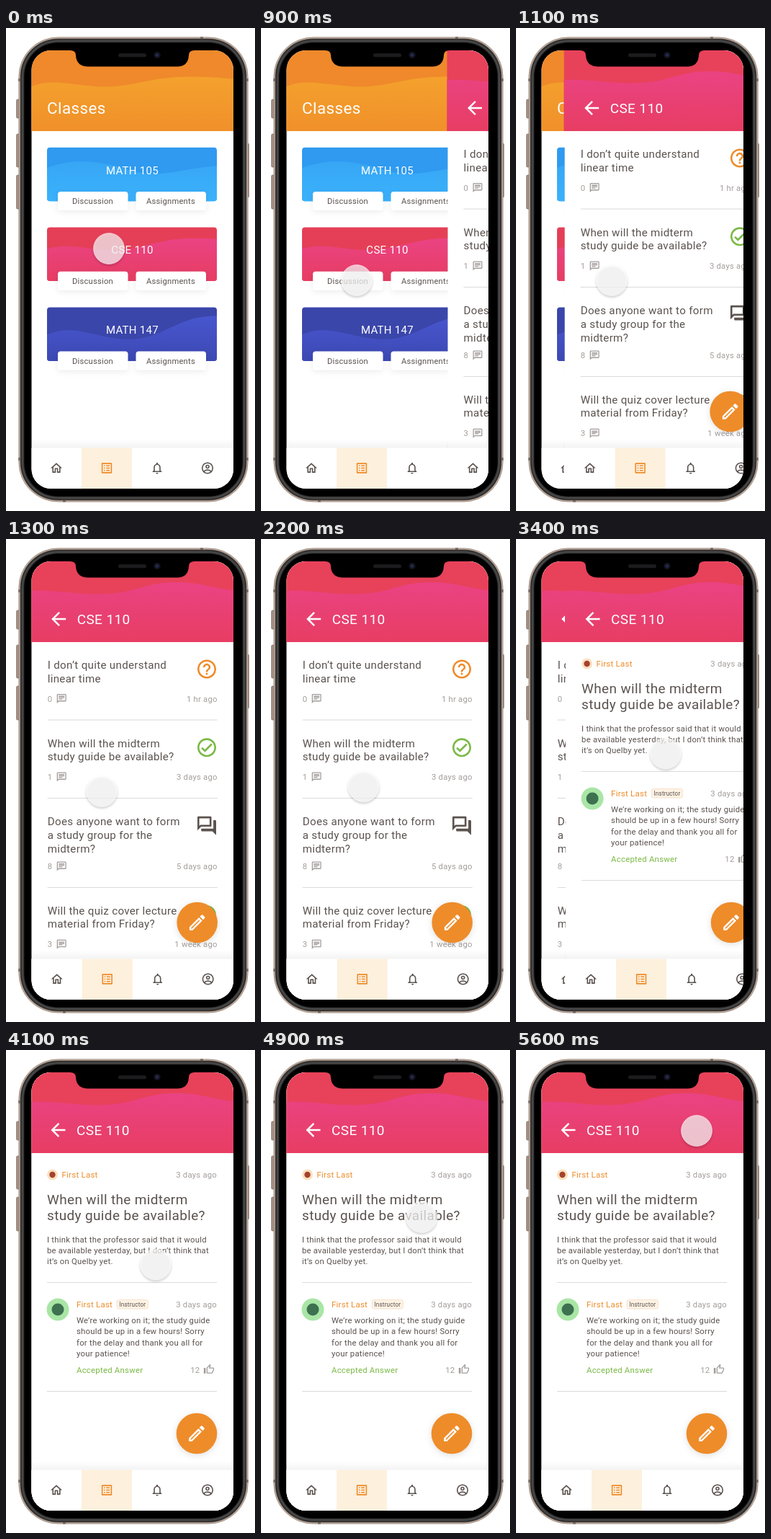
These frames come from a looping animation (346 by 670 pixels, 5700 ms). An HTML page:

```html
<!DOCTYPE html>
<html lang="en">
<head>
<meta charset="utf-8">
<title>Class discussion app</title>
<style>
html, body { margin: 0; width: 100%; height: 100%; overflow: hidden; background: #fff; }
svg { display: block; width: 346px; height: 670px; }
text { font-family: Roboto, "Open Sans", sans-serif; letter-spacing: .02em; }
.soft { filter: drop-shadow(0 2px 4px rgba(0,0,0,.08)); }
.fab { filter: drop-shadow(0 2px 5px rgba(0,0,0,.12)); }
.sheen { filter: blur(1px); }
#cursor { filter: drop-shadow(0 2px 1.5px rgba(0,0,0,.25)); }
</style>
</head>
<body>
<svg id="stage" viewBox="0 0 346 670"></svg>
<script>
const INK = '#5b524e', PALE = '#a39d9a', ORANGE = '#ee8c2a', GREEN = '#7ab945', LOOP = 5700;

const ring = 'M12 2C6.48 2 2 6.48 2 12s4.48 10 10 10 10-4.48 10-10S17.52 2 12 2zm0 18c-4.41 0-8-3.59-8-8s3.59-8 8-8 8 3.59 8 8-3.59 8-8 8z';
const icons = {
  home: 'M12 5.69l5 4.5V18h-2v-6H9v6H7v-7.81l5-4.5M12 3L2 12h3v8h6v-6h2v6h6v-8h3L12 3z',
  list: 'M19 5v14H5V5h14m1.1-2H3.9c-.5 0-.9.4-.9.9v16.2c0 .4.4.9.9.9h16.2c.4 0 .9-.5.9-.9V3.9c0-.5-.5-.9-.9-.9zM11 7h6v2h-6zm0 4h6v2h-6zm0 4h6v2h-6zM7 7h2v2H7zm0 4h2v2H7zm0 4h2v2H7z',
  bell: 'M12 22c1.1 0 2-.9 2-2h-4c0 1.1.89 2 2 2zm6-6v-5c0-3.07-1.64-5.64-4.5-6.32V4c0-.83-.67-1.5-1.5-1.5s-1.5.67-1.5 1.5v.68C7.63 5.36 6 7.92 6 11v5l-2 2v1h16v-1l-2-2zm-2 1H8v-6c0-2.48 1.51-4.5 4-4.5s4 2.02 4 4.5v6z',
  user: ring + 'M12 6a3.5 3.5 0 1 0 0 7 3.5 3.5 0 0 0 0-7zm0 2a1.5 1.5 0 1 1 0 3 1.5 1.5 0 0 1 0-3zM5.6 16.8l1.4 1.5c2.6-2.4 7.4-2.4 10 0l1.4-1.5c-3.2-3.4-9.6-3.4-12.8 0z',
  help: ring + 'M11 18h2v-2h-2zM12 6c-2.21 0-4 1.79-4 4h2c0-1.1.9-2 2-2s2 .9 2 2c0 2-3 1.75-3 5h2c0-2.25 3-2.5 3-5 0-2.21-1.79-4-4-4z',
  check: ring + 'M16.59 7.58L10 14.17l-2.59-2.58L6 13l4 4 8-8z',
  forum: 'M15 4v7H5.17L4 12.17V4h11m1-2H3c-.55 0-1 .45-1 1v14l4-4h10c.55 0 1-.45 1-1V3c0-.55-.45-1-1-1zm5 4h-2v9H6v2c0 .55.45 1 1 1h11l4 4V7c0-.55-.45-1-1-1z',
  chat: 'M4 4h16v12H5.17L4 17.17V4m0-2c-1.1 0-1.99.9-1.99 2L2 22l4-4h14c1.1 0 2-.9 2-2V4c0-1.1-.9-2-2-2H4zm2 10h8v2H6zm0-3h12v2H6zm0-3h12v2H6z',
  edit: 'M14.06 9.02l.92.92L5.92 19H5v-.92l9.06-9.06M17.66 3c-.25 0-.51.1-.7.29l-1.83 1.83 3.75 3.75 1.83-1.83c.39-.39.39-1.02 0-1.41l-2.34-2.34c-.2-.2-.45-.29-.71-.29zm-3.6 3.19L3 17.25V21h3.75L17.81 9.94z',
  thumb: 'M9 21h9c.83 0 1.54-.5 1.84-1.22l3.02-7.05c.09-.23.14-.47.14-.73v-2c0-1.1-.9-2-2-2h-6.31l.95-4.57.03-.32c0-.41-.17-.79-.44-1.06L14.17 1 7.58 7.59C7.22 7.95 7 8.45 7 9v10c0 1.1.9 2 2 2zM9 9l4.34-4.34L12 10h9v2l-3 7H9zM1 9h4v12H1z',
  back: 'M20 11H7.83l5.59-5.59L12 4l-8 8 8 8 1.41-1.41L7.83 13H20z'
};

const icon = (name, x, y, scale, color) =>
  `<path fill="${color}" fill-rule="evenodd" transform="translate(${x} ${y}) scale(${scale}) translate(-12 -12)" d="${icons[name]}"/>`;
const text = (x, y, size, color, str, anchor = 'start') =>
  `<text x="${x}" y="${y}" font-size="${size}" fill="${color}" text-anchor="${anchor}">${str}</text>`;
const lines = (x, y, size, step, rows) =>
  rows.map((s, i) => text(x, y + i * step, size, INK, s)).join('');
const rect = (x, y, w, h, r, fill, more = '') =>
  `<rect x="${x}" y="${y}" width="${w}" height="${h}" rx="${r}" fill="${fill}" ${more}/>`;
const circle = (x, y, r, fill, more = '') =>
  `<circle cx="${x}" cy="${y}" r="${r}" fill="${fill}" ${more}/>`;
const rule = y => rect(57, y, 236, 1, 0, '#dcdada');
const fade = (id, top, bottom) =>
  `<linearGradient id="${id}" x2="0" y2="1"><stop stop-color="${top}"/><stop offset="1" stop-color="${bottom}"/></linearGradient>`;

const header = (top, fill, wave) =>
  rect(34, 30, 283, 113, 0, top) + `<path fill="url(#${fill})" d="M34 143V${wave}V143z"/>`;

const pinkHeader = () =>
  header('#e8415a', 'pink', '72H36C70 70 100 78 140 76S195 60 235 60S290 70 317 71')
  + icon('back', 72.5, 111, 1.25, '#fff') + text(98, 117.5, 19, '#fff', 'CSE 110');

const nav = () =>
  rect(34, 570, 283, 13, 0, 'url(#lift)') + rect(34, 582.5, 283, 58, 0, '#fff')
  + rect(105, 582.5, 70, 58, 0, '#fdf0dd')
  + ['home', 'list', 'bell', 'user'].map((n, i) =>
      icon(n, 70 + 70 * i, 610.5, .8, i == 1 ? ORANGE : INK)).join('');

const fab = () =>
  circle(265, 532, 28.3, ORANGE, 'class="fab"') + icon('edit', 265, 532, 1.2, '#fff');

const card = (i, name, top, fill, wave) => `<g transform="translate(0 ${i * 110.8})">`
  + rect(57, 165.8, 236, 74.5, 4, top)
  + `<path fill="url(#${fill})" d="M57 ${wave}V236.3a4 4 0 0 1-4 4H61a4 4 0 0 1-4-4z"/>`
  + text(175.5, 202.5, 15, '#fff', name, 'middle')
  + [[72, 'Discussion'], [180.5, 'Assignments']].map(([x, s]) =>
      rect(x, 227, 97.5, 26, 4, '#fff', 'class="soft"')
      + text(x + 48.5, 244.2, 11.2, INK, s, 'middle')).join('') + '</g>';

const thread = (y, rows, meta, count, when, mark, color) =>
  lines(57, y, 15.15, 18.6, rows) + text(57, meta, 11.3, PALE, count)
  + icon('chat', 76.5, meta - 4, .65, PALE) + text(293, meta, 11.3, PALE, when, 'end')
  + icon(mark, 278.3, y + .5, 1.3, color) + rule(meta + 25);

const classes = () =>
  header('#ef892b', 'orange', '81H36C66 67 105 84 150 81S215 60 317 71')
  + text(57, 118.5, 22.4, '#fff', 'Classes')
  + card(0, 'MATH 105', '#2f9af0', 'blue', '194C100 178 140 187 175 198S240 196 293 191')
  + card(1, 'CSE 110', '#e53f57', 'pink', '196C90 184 130 204 175 195S230 178 293 182')
  + card(2, 'MATH 147', '#3a46aa', 'indigo', '204C95 186 130 212 175 210S240 177 293 178');

const threads = () => pinkHeader()
  + thread(180, ['I don’t quite understand', 'linear time'], 225.5, '0', '1 hr ago', 'help', ORANGE)
  + thread(288.8, ['When will the midterm', 'study guide be available?'], 334, '1', '3 days ago', 'check', GREEN)
  + thread(397.3, ['Does anyone want to form', 'a study group for the', 'midterm?'], 458, '8', '5 days ago', 'forum', INK)
  + thread(520.8, ['Will the quiz cover lecture', 'material from Friday?'], 566.3, '3', '1 week ago', 'check', GREEN)
  + fab();

const post = () => pinkHeader()
  + circle(64.5, 173, 7.5, '#fbe0bd') + circle(64.5, 173, 4.2, '#a4412f')
  + text(77.5, 177, 11.5, ORANGE, 'First Last') + text(293, 177, 11.3, PALE, '3 days ago', 'end')
  + lines(57, 213.5, 18.95, 22.7, ['When will the midterm', 'study guide be available?'])
  + lines(57, 267, 11.3, 15.1, ['I think that the professor said that it would',
      'be available yesterday, but I don’t think that', 'it’s on Quelby yet.'])
  + rule(322)
  + circle(72, 360, 15.5, '#a9e6a6') + circle(72, 360, 8.5, '#3d7150')
  + text(98, 356.7, 11.5, ORANGE, 'First Last')
  + rect(154, 346.5, 43.5, 12.5, 2.5, '#fdf2e4', 'stroke="#f6dfc4" stroke-width=".8"')
  + text(175.8, 355.7, 8.2, INK, 'Instructor', 'middle')
  + text(293, 356.7, 11.3, PALE, '3 days ago', 'end')
  + lines(98, 379.3, 11.35, 15.1, ['We’re working on it; the study guide',
      'should be up in a few hours! Sorry', 'for the delay and thank you all for', 'your patience!'])
  + text(98, 447.7, 11.4, GREEN, 'Accepted Answer')
  + text(269.5, 447.7, 11.4, PALE, '12', 'end') + icon('thumb', 282, 443, .65, PALE)
  + rule(473) + fab();

const page = (id, body) =>
  `<g id="${id}">${rect(35, 30, 283, 611, 0, '#fff')}${body}${nav()}</g>`;

const button = (x, y, h) => rect(x, y, 5, h, 1.5, '#a58f83', 'stroke="#6d5f58" stroke-width=".6"');

// A rounded frame inset from the outer edge of the phone
const shell = (inset, fill, more) =>
  rect(17.5 + inset, 12.5 + inset, 319 - 2 * inset, 645 - 2 * inset, 55 - inset, fill, more);

const phone = () =>
  button(14.5, 99, 26) + button(14.5, 147, 46) + button(14.5, 204, 47) + button(332.5, 160, 75)
  + shell(.4, '#cdbbae', 'stroke="#8d7a6d" stroke-width=".8"')
  + shell(2, '#5a504a') + shell(3, '#151515')
  + shell(5.5, 'none', 'stroke="#6c6c6c" stroke-width="2" class="sheen"')
  + shell(8, '#000')
  + [12.4, 655].map((y, i) => rect(i ? 79 : 270, y, 4, 2.5, 0, '#6f655f')).join('')
  + [17.3, 334.2].map(x => rect(x, 70, 2.5, 4, 0, '#6f655f') + rect(x, 596, 2.5, 4, 0, '#6f655f')).join('');

const notch = () =>
  '<path d="M89 29V31Q97 31 97 38Q98 53.5 114 53.5H238Q253 53.5 254 38Q254 31 262 31V29z"/>'
  + rect(156, 35.2, 39, 5, 2.5, '#1c1c1e') + circle(210, 37.5, 4.6, '#14141f') + circle(210, 37.5, 2.2, '#252a52');

const stage = document.getElementById('stage');
stage.innerHTML = '<defs>'
  + fade('orange', '#f4a12d', '#f0902a') + fade('pink', '#ea4383', '#e73d63')
  + fade('blue', '#37a6f5', '#3bb2fb') + fade('indigo', '#4856cf', '#3c49b3')
  + '<linearGradient id="lift" x2="0" y2="1"><stop stop-opacity="0"/><stop offset="1" stop-opacity=".05"/></linearGradient>'
  + `<clipPath id="screen">${rect(35.5, 31, 280.5, 608, 27, '#fff')}</clipPath></defs>`
  + phone()
  + `<g clip-path="url(#screen)">${page('classes', classes())}${page('threads', threads())}${page('post', post())}</g>`
  + notch()
  + `<g id="cursor">${circle(0, 0, 21.5, 'rgba(255,255,255,.7)', 'stroke="rgba(255,255,255,.5)"')}</g>`;

const el = id => document.getElementById(id);
const ease = (t, from, to) => {
  const p = Math.min(1, Math.max(0, (t - from) / (to - from)));
  return p * p * (3 - 2 * p);
};

// Each move: start, end, target x, target y
const moves = [[0, 600, 133, 350], [2000, 2900, 208, 297.5], [4500, 5500, 251, 112]];

function slide(id, t, start, rest) {
  const p = ease(t, start, start + 400);
  el(id).setAttribute('transform', `translate(${rest + 281 * (1 - p)} 0)`);
  el(id).style.display = p ? '' : 'none';
}

function draw() {
  const t = performance.now() % LOOP;
  slide('threads', t, 785, .7);
  slide('post', t, 3088, 0);
  let x = 143, y = 306;
  for (const [from, to, tx, ty] of moves) {
    const p = ease(t, from, to);
    x += (tx - x) * p;
    y += (ty - y) * p;
  }
  el('cursor').setAttribute('transform', `translate(${x} ${y})`);
  requestAnimationFrame(draw);
}
draw();
</script>
</body>
</html>
```
